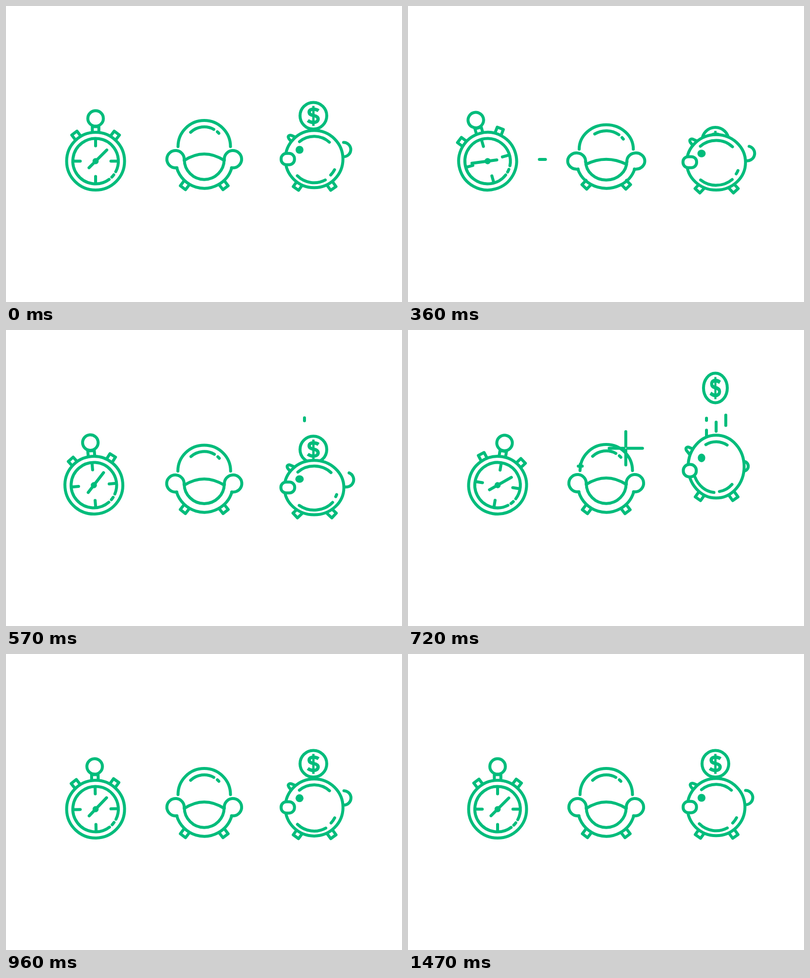
Recreate the animation shown at these times as an HTML page with a canvas. Size 800 by 600 pixels, loop 1.5 s.

```html
<!DOCTYPE html>
<html lang="en">
<head>
<meta charset="utf-8">
<title>Stopwatch, armchair, piggy bank</title>
<style>
  html, body { margin: 0; width: 100%; height: 100%; overflow: hidden; background: #fff; }
  canvas { display: block; }
</style>
</head>
<body>
<canvas id="stage" width="800" height="600"></canvas>
<script>
const ctx = document.getElementById('stage').getContext('2d');
const GREEN = '#00bc7b', LOOP = 1500, STEP = 30, RAD = Math.PI / 180;

// Progress between two times, and easings of it.
const span = (t, from, to) => Math.max(0, Math.min(1, (t - from) / (to - from)));
const easeOut = p => 1 - (1 - p) ** 2;
const smooth = p => p * p * (3 - 2 * p);
const bump = p => Math.sin(p * Math.PI);

// Swings from 1 through zero and back, dying out after `life`.
const spring = (dt, life, power) => Math.cos(dt / 200 * Math.PI) * Math.exp(-((dt / life) ** power));

// Slow build-up, quick release.
const RELEASE = 490;
const tension = t => t < RELEASE ? (t / RELEASE) ** 1.475 : (1 - span(t, RELEASE, 600)) ** 1.7;
const watchTilt = t => -16 * (t < RELEASE ? easeOut(span(t, 0, 250)) : spring(t - RELEASE, 355, 2));
// Positive: flattened on the ground. Negative: stretched in the air.
const pigSquash = t => 1.15 * (t < 500 ? smooth(span(t, 280, 500)) : spring(t - 500, 370, 5));

const COIN_REST = 222.5, COIN_INSIDE = 318, COIN_TOP = 117.5;
function coinHeight(t) {
  if (t < 530) return COIN_REST + (COIN_INSIDE - COIN_REST) * span(t, 280, 390) ** 2;
  return Math.min(COIN_TOP + 200 * ((t - 720) / 190) ** 2, t < 720 ? COIN_INSIDE : COIN_REST);
}

function within(x, y, turn, draw) {
  ctx.save();
  ctx.translate(x, y);
  ctx.rotate(turn * RAD);
  draw();
  ctx.restore();
}

function poly(...pts) {
  ctx.beginPath();
  for (let i = 0; i < pts.length; i += 2) ctx.lineTo(pts[i], pts[i + 1]);
  ctx.stroke();
}

// Builds a path in a scaled space but strokes it with the normal line weight.
function scaled(x, y, sx, sy, build) {
  ctx.save();
  ctx.translate(x, y);
  ctx.scale(sx, sy);
  ctx.beginPath();
  build();
  ctx.restore();
  ctx.stroke();
}

function arc(r, from, to) {
  ctx.beginPath();
  ctx.arc(0, 0, r, from * RAD, to * RAD);
  ctx.stroke();
}

function disc(x, y, rx, ry = rx) {
  ctx.beginPath();
  ctx.ellipse(x, y, rx, ry, 0, 0, 7);
  ctx.fillStyle = '#fff';
  ctx.fill();
  ctx.stroke();
}

function dot(x, y, rx, ry = rx) {
  ctx.beginPath();
  ctx.ellipse(x, y, rx, ry, 0, 0, 7);
  ctx.fillStyle = GREEN;
  ctx.fill();
}

function streak(x, y, turn, half, p) {
  if (p > 0 && p < 1) within(x, y, turn, () => poly(-half * bump(p), 0, half * bump(p), 0));
}

const stub = (base, end) => poly(-6.6, base, -6.6, end, 6.6, end, 6.6, base);

function legs(x, y, spread, turn) {
  for (const side of [-1, 1])
    within(x + side * spread, y, -side * turn, () => stub(-12, 0));
}

function drawWatch(t) {
  [243.5, 262, 271.5, 265, 259].forEach((x, i) => {
    const start = 80 + 75 * (i % 3);
    streak(x, 263 + 24 * i, 0, 8, span(t, start, start + 180));
  });
  const press = 6.5 * bump(span(t, 380, 580));
  const tilt = watchTilt(t);
  within(181 - 31.7 * tension(t), 314.5, tilt, () => {
    within(0, 0, -37, () => stub(-56, press - 71.3));
    within(0, 0, 37, () => stub(-56, -71.3));
    stub(-56, -70);
    disc(0, 0, 58.5);
    disc(0, -86.6, 15.7);
    arc(46, 53.5, 387.7);
    arc(46, 37, 44.6);
    for (let a = 0; a < 360; a += 90) within(0, 0, a, () => poly(0, -31, 0, -45));
    const hand = 45 + 360 * smooth(span(t, 0, 600)) + Math.max(0, .65 * tilt);
    within(0, 0, hand, () => poly(0, 18.8, 0, -32));
    dot(0, 0, 6.2);
  });
}

// Rays leave the centre, then their tails catch up.
function sparkle(x, y, size, t, start) {
  const head = size * easeOut(span(t, start, start + 140));
  const tail = size * easeOut(span(t, start + 105, start + 245));
  if (head - tail < .5) return;
  for (let a = 0; a < 360; a += 90) within(x, y, a, () => poly(0, -tail, 0, -head));
}

function drawChair(t) {
  const dip = .1 * tension(t), light = 145 * dip;
  const shape = build => scaled(400.5, 369.5, 1 + dip / 2, 1 - dip, build);
  const bow = (y, r, from, to) => shape(() => ctx.arc(0, y, r, from * RAD, to * RAD));
  legs(400.5, 368.3 - 25 * dip, 43 + 20 * dip, 37 + 100 * dip);
  bow(-84.5, 53, 180, 360);
  bow(-84.5, 40, light - 133.5, light - 61);
  bow(-84.5, 40, light - 48.5, light - 42.5);
  bow(-58, 58, 16.8, 163.2);
  bow(-58, 40.2, 0, 180);
  for (const side of [-1, 1])
    shape(() => {
      ctx.scale(-side, 1);
      ctx.arc(-58, -59, 17.5, .1, 1.4, true);
    });
  shape(() => {
    const w = 40.3 - 12 * dip, y = -56.5 + 72 * dip;
    ctx.moveTo(-w, y);
    ctx.quadraticCurveTo(0, -82.5 + 140 * dip, w, y);
  });
  sparkle(440, 239.7, 35, t, 607);
  sparkle(348, 276, 20, t, 705);
}

const dollar = new Path2D('M10.5-10.3C7-12.7 3.5-13.4 0-13.4C-5-13.4-8.5-11.5-8.5-7.5C-8.5-2.5-4-1.5 .5-.5'
  + 'C5.5 .6 9.5 2 9.5 6.5C9.5 11 5.5 13.5 .5 13.5C-4 13.5-7.5 12.5-11.3 9.5');

function drawCoin(t) {
  const y = coinHeight(t), k = .11 * span(y, COIN_REST, 160);
  within(621, y, 0, () => {
    disc(0, 0, 27 * (1 - k), 27 * (1 + k));
    ctx.scale(1 - k, 1 + k);
    ctx.lineCap = 'butt';
    ctx.lineWidth = 6.8;
    ctx.stroke(dollar);
    ctx.lineWidth = 4.8;
    poly(0, -20, 0, 20.5);
  });
}

function drawPig(t) {
  for (let i = 0; i < 4; i++) {
    const column = i % 3, row = Math.floor(i / 3), start = 575 + 27 * column - 22 * row;
    streak(603 + 19.5 * column, 209 - 13 * column - 28 * row, 90, 10.5, span(t, start, start + 180));
  }
  drawCoin(t);

  // `strain` shifts the features the same way for squash and stretch.
  const s = pigSquash(t), strain = s * s, flat = Math.max(0, s);
  const sx = 1 + .05 * s + .022 * strain, sy = 1 - .095 * s;
  const cx = 622.5, cy = 310.3 + 22.7 * s - 10 * strain;

  within(cx + 59.5 + 8.5 * s + 4 * strain, cy - 19.3 - 2 * s + 16 * strain, 42 * flat,
    () => arc(14.5 + 2 * s - 2.5 * strain, -90, 90));
  within(cx - 45.5 - 8.5 * strain, cy - 42.3 + 8.5 * strain, 0, () => {
    ctx.beginPath();
    ctx.moveTo(0, 8);
    ctx.lineTo(-5.5, 1);
    ctx.bezierCurveTo(-9, -5, -4, -7, 0, -5.5);
    ctx.lineTo(8, -2);
    ctx.stroke();
  });
  legs(cx + 1, cy + 58 * sy + 1.5, 37.8 + 2.7 * flat, 35.5 + 21.5 * flat);
  disc(cx, cy, 58.2 * sx, 58 * sy);

  const shine = (r, middle, half) => scaled(cx, cy, sx, sy,
    () => ctx.arc(0, 0, r, (middle - half) * RAD, (middle + half) * RAD));
  shine(46, -89, 41 + 9 * s - 3 * strain);
  shine(48, 98.5 - 27 * s, 36.5 + 10.5 * s + 4.5 * strain);
  shine(46.5, 35.8 - 27 * s, Math.max(2, 8.2 - 10 * s));

  dot(cx - 29.5, cy - (18.8 - 2.5 * strain) * sy, 8 * sx * sx, 8 * sy);
  const noseW = 13.5 * sx, noseH = 11.5 * sy;
  ctx.beginPath();
  ctx.roundRect(cx - 53.2 - noseW, cy - 3 * s + 5 * strain - noseH, 2 * noseW, 2 * noseH, noseH * .95);
  ctx.fillStyle = '#fff';
  ctx.fill();
  ctx.stroke();
}

function render() {
  const t = Math.floor(performance.now() % LOOP / STEP) * STEP;
  ctx.fillStyle = '#fff';
  ctx.fillRect(0, 0, 800, 600);
  ctx.strokeStyle = GREEN;
  ctx.lineWidth = 6;
  ctx.lineCap = ctx.lineJoin = 'round';
  drawWatch(t);
  drawChair(t);
  drawPig(t);
  requestAnimationFrame(render);
}
render();
</script>
</body>
</html>
```
